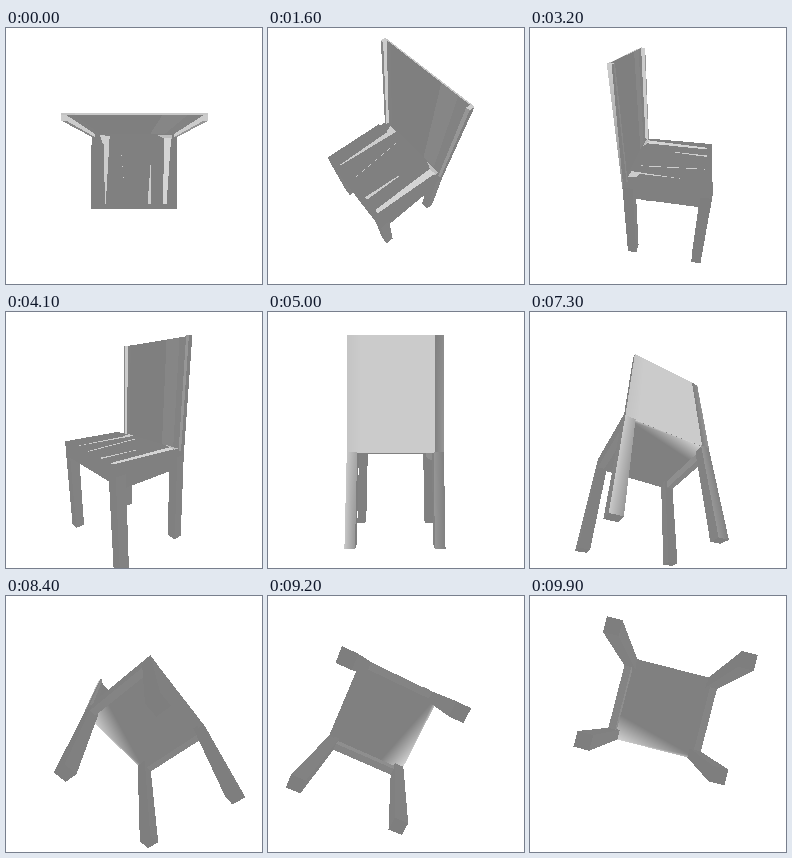
Animation of 256 by 256 pixels, one loop 10000 ms. Source, as an HTML page with a canvas:

```html
<!DOCTYPE html>
<html>
<head>
<meta charset="utf-8">
<style>
html, body { margin: 0; width: 100%; height: 100%; overflow: hidden; background: #fff; }
canvas { display: block; width: 256px; height: 256px; }
</style>
</head>
<body>
<canvas id="stage" width="256" height="256"></canvas>
<script>
const SIZE = 256, MID = 128;
const STEPS = 100, STEP_MS = 100;
const FOCAL = 228, DIST = 2.445;
const BASE = 128, LIT = 204;

const ctx = document.getElementById('stage').getContext('2d');
const image = ctx.createImageData(SIZE, SIZE);
const pixels = new Uint32Array(image.data.buffer);
const depth = new Float32Array(SIZE * SIZE);
const faces = [];

// A face is four points plus one grey, or one grey per point.
function quad(points, grey) {
  faces.push({ points, grey: Array.isArray(grey) ? grey : [grey, grey, grey, grey] });
}

// Solid between two horizontal rectangles [x0, x1, z0, z1].
function prism(y0, lo, y1, hi, tone = {}) {
  const ring = (y, [x0, x1, z0, z1]) => [[x0, y, z0], [x1, y, z0], [x1, y, z1], [x0, y, z1]];
  const a = ring(y0, lo), b = ring(y1, hi);
  quad(a, tone.bottom ?? BASE);
  quad(b, tone.top ?? BASE);
  ['back', 'right', 'front', 'left'].forEach((side, i) => {
    const j = (i + 1) % 4;
    quad([a[i], a[j], b[j], b[i]], tone[side] ?? BASE);
  });
}

// Flat patch on the seat, as [x, z] pairs.
function patch(corners, grey) {
  quad(corners.map(([x, z]) => [x, -0.042, z]), grey);
}

const X0 = -0.46, X1 = 0.472, BACK = -0.255, FRONT = 0.575;

function buildSeat() {
  prism(-0.13, [X0, X1, BACK, FRONT], -0.05, [X0, X1, BACK, FRONT], { back: LIT });
  for (const [a, b] of [[X0, X0 + 0.07], [X1 - 0.07, X1]]) {
    prism(-0.22, [a, b, BACK + 0.01, FRONT], -0.1, [a, b, BACK + 0.01, FRONT],
      { right: a < 0 ? 142 : BASE, bottom: 132 });
  }
  prism(-0.17, [X0, X1, FRONT - 0.05, FRONT], -0.1, [X0, X1, FRONT - 0.05, FRONT]);

  // raised side rim
  const rim = [X0, -0.335, -0.12, FRONT];
  prism(-0.06, rim, -0.012, rim);

  // glow under the rear edge
  quad([[X0 + 0.05, -0.132, BACK], [X1 - 0.05, -0.132, BACK],
    [X1 - 0.05, -0.132, BACK + 0.03], [X0 + 0.05, -0.132, 0]], [215, 185, BASE, BASE]);

  patch([[-0.33, -0.22], [-0.265, -0.22], [-0.308, 0.52], [-0.318, 0.52]], LIT);
  patch([[-0.37, -0.225], [-0.32, -0.225], [-0.32, -0.13], [-0.345, -0.14]], LIT);
  patch([[0.33, -0.2], [0.405, -0.2], [0.355, 0.52], [0.315, 0.52]], 212);
  patch([[0.25, -0.23], [0.42, -0.23], [0.415, -0.18], [0.33, -0.19]], 190);
  patch([[0.18, 0.1], [0.19, 0.12], [0.18, 0.52], [0.148, 0.52]], LIT);

  // fine upright ridge, seen only from the side
  quad([[-0.15, -0.049, -0.15], [-0.09, -0.049, 0.5],
    [-0.09, -0.041, 0.5], [-0.15, -0.041, -0.15]], 205);
}

function buildBack() {
  const lean = 0.017, top = 1;
  const slab = (x0, x1, z0, z1, tone) =>
    prism(-0.125, [x0, x1, z0, z1], top, [x0, x1, z0 - lean, z1 - lean], tone);
  const cut = X0 + 0.085, post = 0.03;
  const z = BACK - lean;

  // panel in slightly different upright bands
  slab(X0, cut, BACK, BACK + 0.012, { back: [150, BASE, BASE, 140], left: 150, top: 195 });
  slab(cut, 0.18, BACK, BACK + 0.012, { back: 203, front: 127, top: 200 });
  slab(0.18, 0.34, BACK, BACK + 0.012, { back: 203, front: 134, top: 200 });
  slab(0.34, X1, BACK, BACK + 0.012, { back: [203, 196, 196, 203], front: 130, top: 200 });

  slab(X0, X0 + post, BACK + 0.012, BACK + 0.048, { right: LIT, front: 136, top: LIT });
  slab(X1 - post, X1, BACK + 0.012, BACK + 0.048, { left: LIT, front: 150, top: LIT });

  // light rear edge on one side
  quad([[X0 - 0.003, -0.1, BACK], [X0 - 0.003, -0.1, BACK + 0.01],
    [X0 - 0.003, top, z + 0.035], [X0 - 0.003, top, z]], [150, 140, LIT, LIT]);
}

function buildLegs() {
  const w = 0.1, foot = -1.04;
  for (const right of [false, true]) {
    for (const front of [false, true]) {
      const x = right ? X1 - w : X0;
      const z = front ? FRONT - w : BACK;
      const dx = right ? 0.018 : -0.01;
      const dz = -0.01;
      const tone = { bottom: 126, left: 126, right: 130 };
      if (!front) tone.back = right ? [150, 200, 200, 165] : [BASE, 150, 150, BASE];
      prism(foot, [x + dx, x + w + dx, z + dz, z + w + dz],
        -0.1, [x, x + w, z, z + w], tone);
    }
  }
}

function camera(step) {
  const turn = Math.PI + step / STEPS * 8 * Math.PI;
  const tilt = Math.PI / 2 - Math.PI * step / (STEPS - 1);
  const flip = step === 0 || step === STEPS - 1 ? -1 : 1; // up is reversed at the poles
  const ct = Math.cos(turn), st = Math.sin(turn);
  const ce = Math.cos(tilt), se = Math.sin(tilt);
  return ([x, y, z]) => {
    const side = x * ct - z * st;
    const near = x * st + z * ct;
    const inv = 1 / (DIST - y * se - near * ce);
    const scale = FOCAL * inv * flip;
    return [MID + side * scale, MID - (y * ce - near * se) * scale, inv];
  };
}

function triangle(a, b, c, ga, gb, gc) {
  const area = (b[0] - a[0]) * (c[1] - a[1]) - (b[1] - a[1]) * (c[0] - a[0]);
  if (Math.abs(area) < 1e-6) return;
  const low = k => Math.max(0, Math.floor(Math.min(a[k], b[k], c[k])));
  const high = k => Math.min(SIZE - 1, Math.ceil(Math.max(a[k], b[k], c[k])));
  const x0 = low(0), x1 = high(0), y0 = low(1), y1 = high(1);
  for (let y = y0; y <= y1; y++) {
    for (let x = x0; x <= x1; x++) {
      const px = x + 0.5, py = y + 0.5;
      const u = ((b[0] - px) * (c[1] - py) - (b[1] - py) * (c[0] - px)) / area;
      const v = ((c[0] - px) * (a[1] - py) - (c[1] - py) * (a[0] - px)) / area;
      const w = 1 - u - v;
      if (u < 0 || v < 0 || w < 0) continue;
      const d = u * a[2] + v * b[2] + w * c[2];
      const at = y * SIZE + x;
      if (d <= depth[at]) continue;
      depth[at] = d;
      const g = Math.round(u * ga + v * gb + w * gc);
      pixels[at] = (0xff000000 | g << 16 | g << 8 | g) >>> 0;
    }
  }
}

function draw(step) {
  pixels.fill(0xffffffff);
  depth.fill(0);
  const project = camera(step);
  for (const { points, grey: g } of faces) {
    const [a, b, c, d] = points.map(project);
    triangle(a, b, c, g[0], g[1], g[2]);
    triangle(a, c, d, g[0], g[2], g[3]);
  }
  ctx.putImageData(image, 0, 0);
}

buildSeat();
buildBack();
buildLegs();

const start = performance.now();
let shown = -1;
function tick() {
  const step = Math.floor(Math.max(0, performance.now() - start) / STEP_MS) % STEPS;
  if (step !== shown) draw(shown = step);
  requestAnimationFrame(tick);
}
tick();
</script>
</body>
</html>
```
